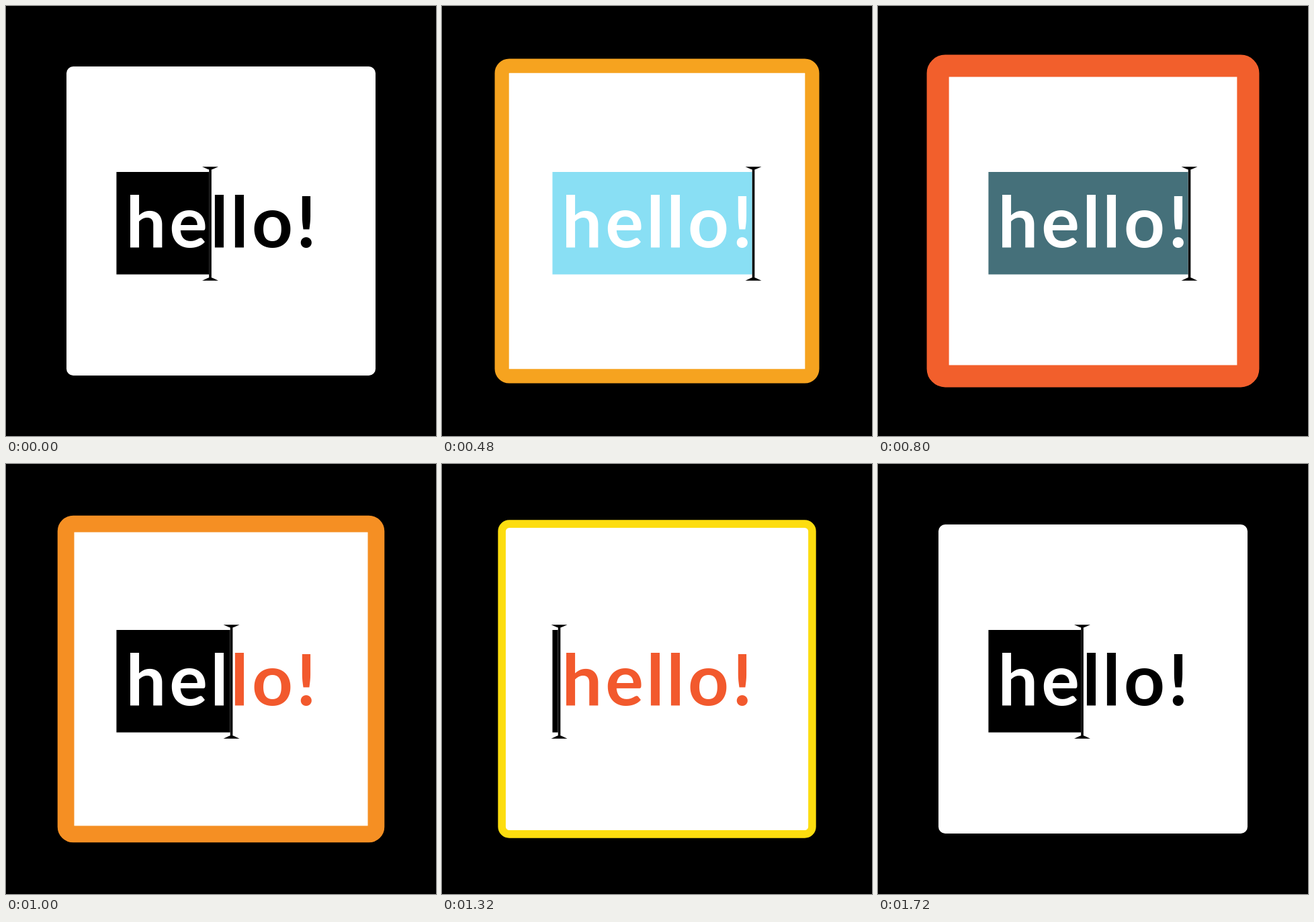
These frames come from a looping animation (640 by 640 pixels, 1.76 s). An HTML page:

```html
<!DOCTYPE html>
<html lang="en">
<head>
<meta charset="utf-8">
<title>hello!</title>
<style>
  html, body { margin: 0; width: 100%; height: 100%; overflow: hidden; background: #000; }
  svg { display: block; width: 100%; height: 100%; }
  text { font: 700 106px Lato, sans-serif; text-anchor: middle; }
</style>
</head>
<body>
<svg viewBox="0 0 640 640">
  <defs>
    <clipPath id="selected"><rect id="clip" x="164.4" y="247" height="152.4"/></clipPath>
    <text id="word" y="359" x="208.5 271.5 317.5 347.5 396.5 447">hello!</text>
  </defs>
  <rect x="90" y="90" width="460" height="460" rx="10" fill="#fff"/>
  <rect id="border" x="89.1" y="89.1" width="461.8" height="461.8" rx="11" fill="none"/>
  <use id="plain" href="#word"/>
  <g clip-path="url(#selected)">
    <rect id="highlight" x="160" y="240" width="320" height="170"/>
    <use href="#word" fill="#fff"/>
  </g>
  <path id="cursor" d="M-12 239.3H12L4 242.8L1.8 243.6V404.2L4 405L12 408.7H-12L-4 405L-1.8 404.2V243.6L-4 242.8Z"/>
</svg>
<script>
const FRAME = 40, LOOP = 1760, LAST = 1720;
const LEFT = 174.5, RIGHT = 463.5;
const BLACK = [0, 0, 0], BLUE = [137, 223, 244], RED = [242, 89, 45];
const $ = id => document.getElementById(id);

// Piecewise linear value through [position, value] stops, held at both ends.
function track(stops, at) {
  if (at <= stops[0][0]) return stops[0][1];
  for (let i = 1; i < stops.length; i++) {
    const [a, from] = stops[i - 1], [b, to] = stops[i];
    if (at > b) continue;
    const mix = (p, q) => p + (q - p) * (at - a) / (b - a);
    return Array.isArray(from) ? from.map((p, k) => mix(p, to[k])) : mix(from, to);
  }
  return stops[stops.length - 1][1];
}

const rgb = color => `rgb(${color.map(Math.round)})`;

const cursorX = [[0, 304], [240, RIGHT], [807, RIGHT], [1243, LEFT], [1525, LEFT], [LAST, 304]];
const borderWidth = [[40, 0], [760, 34.7], [1600, 0]];
const borderColor = [[8.5, [255, 239, 10]], [21.2, [246, 163, 31]], [34.7, [241, 86, 46]]];
const highlightColor = [[80, BLACK], [240, BLUE], [720, BLUE], [880, BLACK]];
const textColor = [[240, BLACK], [400, RED], [1420, RED], [1580, BLACK]];

function draw(now) {
  // The pose at the end of the loop is repeated at its start.
  const t = Math.floor(now % LOOP / FRAME) * FRAME % LAST;
  const x = track(cursorX, t), width = track(borderWidth, t);
  $("cursor").setAttribute("transform", `translate(${x} 0)`);
  $("clip").setAttribute("width", x - 1.9 - 164.4);
  $("border").setAttribute("stroke-width", width);
  $("border").setAttribute("stroke", rgb(track(borderColor, width)));
  $("highlight").setAttribute("fill", rgb(track(highlightColor, t)));
  $("plain").setAttribute("fill", rgb(track(textColor, t)));
}

const start = performance.now();
function tick() {
  draw(performance.now() - start);
  requestAnimationFrame(tick);
}
tick();
</script>
</body>
</html>
```
